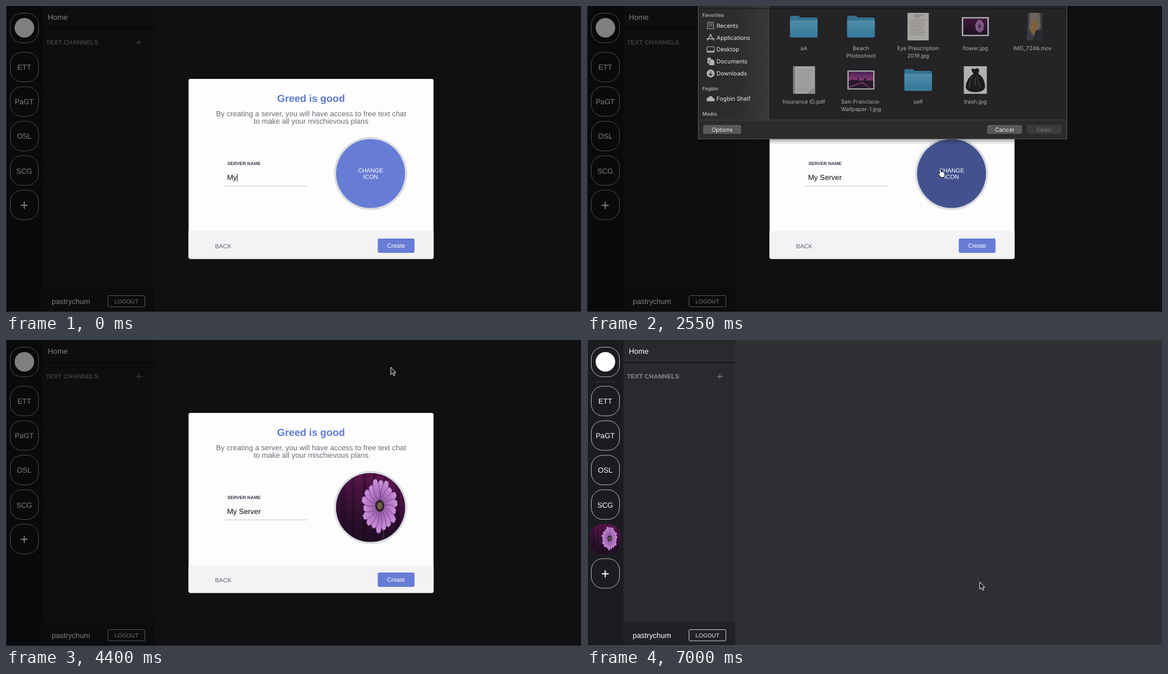
These frames come from a looping animation (1000x533 px, 7550 ms). An HTML page:

```html
<!DOCTYPE html>
<html lang="en">
<head>
<meta charset="utf-8">
<title>Create a server</title>
<style>
html, body { margin: 0; width: 100%; height: 100%; overflow: hidden; background: #101013; }
svg { display: block; width: 100vw; height: 100vh; }
text { font-family: "Liberation Sans", Arial, sans-serif; text-rendering: geometricPrecision; white-space: pre; }
#sheet text { font-family: Inter, Roboto, sans-serif; }
.mid { text-anchor: middle; }
.b { font-weight: 700; }
</style>
</head>
<body>
<svg viewBox="0 0 1000 533" preserveAspectRatio="none">
  <defs>
    <linearGradient id="plum" x1="0" y1="1" x2=".35" y2="0">
      <stop offset="0" stop-color="#180a1a"/><stop offset=".5" stop-color="#301031"/><stop offset="1" stop-color="#571549"/>
    </linearGradient>
    <linearGradient id="petalFill" x1="0" x2="0" y1="0" y2="1">
      <stop offset="0" stop-color="#cf93da"/><stop offset="1" stop-color="#8f58a4"/>
    </linearGradient>
    <linearGradient id="blue" x1="0" x2="0" y1="0" y2="1">
      <stop offset="0" stop-color="#62bfe8"/><stop offset="1" stop-color="#3f9fcf"/>
    </linearGradient>
    <linearGradient id="dusk" x1="0" x2="0" y1="0" y2="1">
      <stop offset="0" stop-color="#5b1f6b"/><stop offset=".5" stop-color="#b04a9a"/><stop offset=".6" stop-color="#38203f"/><stop offset="1" stop-color="#1d1224"/>
    </linearGradient>
    <linearGradient id="side" x1="0" x2="1" y1="0" y2="0">
      <stop offset="0" stop-color="#2a2a2b"/><stop offset=".55" stop-color="#2d2d2e"/><stop offset="1" stop-color="#3a3a3b"/>
    </linearGradient>
    <linearGradient id="shade" x1="0" x2="0" y1="0" y2="1">
      <stop offset="0" stop-color="#000" stop-opacity=".3"/><stop offset="1" stop-color="#000" stop-opacity="0"/>
    </linearGradient>
    <clipPath id="disc"><circle cx="634" cy="291.8" r="60"/></clipPath>
    <clipPath id="pill"><rect x="6" y="320.5" width="52" height="53" rx="20"/></clipPath>
    <clipPath id="thumb"><rect x="-21" y="-14.5" width="42" height="29"/></clipPath>
    <g id="flower"></g>
  </defs>

  <rect width="1000" height="533" fill="#2f3034"/>
  <rect x="63" width="194.5" height="533" fill="#292a2e"/>
  <rect width="63.5" height="533" fill="#1b1c20"/>
  <rect x="63" y="491" width="194.5" height="42" fill="#212226"/>
  <rect x="64" y="38" width="193.5" height="2" fill="#141518"/>
  <rect x="13" y="72" width="37" height="1.5" fill="#2b2c30"/>
  <rect id="veil" width="1000" height="533" fill="#000"/>

  <g id="faint" fill="none" stroke="#b8b8bb">
    <path d="M0.5 0V533M0 532.5H1000" stroke="#58595d"/>
    <g id="pills"></g>
    <rect x="177.5" y="504.5" width="64" height="19.5" rx="2" stroke="#d0d0d2"/>
    <path d="M226 63.5h10M231 58.5v10" stroke="#77787c" stroke-width="1.3"/>
    <text x="69.5" y="67" class="b" font-size="10.85" fill="#8a8b8f" stroke="none">TEXT CHANNELS</text>
  </g>
  <g id="bright" fill="#fff">
    <circle cx="32" cy="38" r="17"/>
    <g id="labels"></g>
    <text x="72.7" y="24" font-size="12.9">Home</text>
    <text x="79.5" y="518.5" font-size="12.9">pastrychum</text>
    <text x="209.5" y="517.8" font-size="9.8" class="mid" fill="#e2e2e4">LOGOUT</text>
  </g>
  <g id="plus">
    <rect x="7.5" y="320.8" width="49" height="51.5" rx="20" fill="none" stroke="#b8b8bb" id="plusBox"/>
    <path d="M25.7 347.3h12M31.7 341.3v12" stroke="#fff" stroke-width="1.9" id="plusSign"/>
  </g>
  <g id="newServer" clip-path="url(#pill)"><use href="#flower" transform="translate(6 320.5) scale(.4375)"/></g>

  <g id="modal">
    <rect x="317.5" y="127" width="426" height="313.5" rx="3" fill="#fdfdfe"/>
    <path d="M317.5 392h426v45.500q0 3-3 3h-420q-3 0-3-3z" fill="#f3f2f5"/>
    <g class="mid">
      <text x="530.5" y="166.7" class="mid b" font-size="17.55" fill="#607ad0">Greed is good</text>
      <g fill="#6a6d75" font-size="12.88">
        <text x="530.5" y="192.3">By creating a server, you will have access to free text chat</text>
        <text x="530.5" y="205.4">to make all your mischievous plans</text>
      </g>
    </g>
    <text x="385" y="277.2" class="b" font-size="7.9" fill="#363b4b">SERVER NAME</text>
    <text id="name" x="384.4" y="303" font-size="12.85" fill="#0c0c0e"></text>
    <rect id="caret" y="292" width="1" height="13.500" fill="#111"/>
    <rect x="378" y="312.500" width="146" height="1.700" fill="#dcdde1"/>
    <circle cx="634" cy="291.8" r="63.7" fill="#dcdde1"/>
    <circle id="disk" cx="634" cy="291.8" r="60"/>
    <g class="mid" fill="#fff" font-size="10.3">
      <text x="634" y="290.3">CHANGE</text><text x="634" y="300.6">ICON</text>
    </g>
    <g id="photo" clip-path="url(#disc)"><use href="#flower" x="574" y="231.8"/></g>
    <text x="363.500" y="421.600" font-size="10.5" fill="#62656e">BACK</text>
    <rect id="create" x="646.500" y="405" width="64" height="25" rx="3"/>
    <text x="678.400" y="421" class="mid" font-size="10.5" fill="#fff">Create</text>
  </g>

  <g id="sheet">
    <rect x="194" y="233" width="640" height="9" fill="url(#shade)"/>
    <rect x="193.500" y="-40" width="641" height="272.500" fill="#2b2b2c" stroke="#575758"/>
    <g id="content">
      <rect x="194" y="-10" width="124" height="209" fill="url(#side)"/>
      <rect x="318.500" y="-10" width="515.500" height="209" fill="#242325"/>
      <path d="M318.500 0V199" stroke="#121213"/>
      <path d="M194 5.500H834" stroke="#161617"/>
      <g id="sidebar"></g>
      <g id="files"></g>
    </g>
    <path d="M194 199.500H834" stroke="#434345"/>
    <g class="mid" font-size="10" fill="#ececec">
      <rect x="202" y="208" width="66" height="15.500" rx="2.500" fill="#59595b"/>
      <text x="235" y="219.500">Options</text>
      <rect x="696" y="208" width="60.500" height="15.500" rx="2.500" fill="#59595b"/>
      <text x="726" y="219.500">Cancel</text>
      <rect id="open" x="765" y="208" width="60.500" height="15.500" rx="2.500"/>
      <text id="openText" x="795" y="219.500">Open</text>
    </g>
  </g>

  <g id="mouse">
    <path id="arrow" d="M0 0V12.600L3 10L5.200 14.600L7.300 13.600L5.200 9.200H8.800Z" fill="#111" stroke="#fff" stroke-linejoin="round"/>
    <path id="hand" d="M-2.600 1.400Q-2.600 0-1.400 0Q-.2 0 0 1.400L1 5Q2.200 4.200 3.200 5.200Q4.500 4.600 5.300 5.800Q7 5.600 7 7.400V10Q7 12 6 13V14.500H0Q-.5 12.500-2.500 10.600L-4.500 8.200Q-4.600 6.800-3 7L-1.400 8.400Z" fill="#fff" stroke="#111" stroke-linejoin="round"/>
  </g>
</svg>
<script>
const LOOP = 7550;
const $ = id => document.getElementById(id);
const set = (id, attrs) => { for (const k in attrs) $(id).setAttribute(k, attrs[k]); };
const show = (id, on) => set(id, { visibility: on ? 'visible' : 'hidden' });
const ramp = (t, from, to) => Math.min(1, Math.max(0, (t - from) / (to - from)));
const ease = u => u * u * (3 - 2 * u);
const mix = (a, b, u) => a + (b - a) * u;
const blend = (a, b, u) => `rgb(${a.map((v, i) => Math.round(mix(v, b[i], u)))})`;

// Flower picture, 120 units high, wide enough for any crop
function flower() {
  let s = '<rect x="-45" width="190" height="120" fill="url(#plum)"/>';
  for (let i = 0; i < 9; i++)
    s += `<rect x="${-30 + i * 19}" width="${4 + i * 7 % 5}" height="120" fill="#150617" opacity=".3"/>`;
  s += '<path d="M79 60Q84 95 82 120" stroke="#3a2140" stroke-width="3" fill="none"/><g transform="translate(76 57) scale(.68 1)">';
  for (let i = 0; i < 18; i++) {
    const long = 45 + 3 * Math.sin(i * 2.3);
    s += `<path transform="rotate(${i * 20 + 4})" d="M0 -6C-9 -18-10 ${6 - long} -3 ${-long}Q0 ${1 - long} 3 ${-long}C10 ${6 - long} 9 -18 0 -6Z" fill="url(#petalFill)" stroke="#6a3a80" stroke-width=".9"/>`;
  }
  return s + '</g><ellipse cx="76" cy="57" rx="8" ry="10.500" fill="#33232b"/><ellipse cx="76" cy="57" rx="4.500" ry="6" fill="#6f6049"/>';
}

function serverList() {
  ['', 'ETT', 'PaGT', 'OSL', 'SCG'].forEach((name, i) => {
    const y = i ? 20.5 + i * 60.1 : 12.500;
    $('pills').innerHTML += `<rect x="7.5" y="${y}" width="49" height="51.500" rx="20"/>`;
    $('labels').innerHTML += `<text x="31.7" y="${y + 30.600}" class="mid" font-size="12.700">${name}</text>`;
  });
}

const icons = {
  tray: '<path d="M-5-6H5V1L6 5H-6L-5 1ZM-3-3H3M-3 0H3" />',
  tools: '<path d="M-6 5L1-6M6 5L-1-6M-7 2H7" stroke-width="1.500"/>',
  screen: '<rect x="-6.500" y="-5" width="13" height="10" rx="1"/><path d="M-6 3H6" stroke-width="2"/>',
  pages: '<path d="M-5-6H0V-3H4L6-1V6H-2V3H-5Z" fill="#b2b2b4"/><path d="M-2 3V-3" stroke="#333"/>',
  down: '<circle r="6.500" fill="#b2b2b4"/><path d="M0-3.500V3M-3 0.500L0 3.500L3 .5" stroke="#333" stroke-width="1.500"/>',
  cloud: '<path d="M-5 4Q-8 3-6.500 0Q-5-2-3.500-1.500Q-2-5 1.500-4Q4-3 4-.5Q7-.5 7 2Q7 4 5 4Z" fill="#b2b2b4"/>'
};

function sidebar() {
  const head = (y, s) => `<text x="200.500" y="${y}" font-size="8.500" font-weight="600" fill="#a9a9ab">${s}</text>`;
  const row = (y, icon, s) =>
    `<g transform="translate(215 ${y - 3.500})" fill="none" stroke="#b2b2b4">${icons[icon]}</g><text x="225.300" y="${y}" font-size="10" fill="#e6e6e7">${s}</text>`;
  $('sidebar').innerHTML = head(20, 'Favorites') + row(38.600, 'tray', 'Recents') + row(59.500, 'tools', 'Applications') +
    row(80.200, 'screen', 'Desktop') + row(101, 'pages', 'Documents') + row(121.800, 'down', 'Downloads') +
    head(147.500, 'Fogbin') + row(165.800, 'cloud', 'Fogbin Shelf') + head(191.700, 'Media');
}

// Thumbnails, each centred on its own origin
const lines = (x, y, w, n, gap, color) =>
  `<path d="${Array.from({ length: n }, (_, i) => `M${x} ${y + i * gap}h${w - i * 5 % 7}`).join('')}" stroke="${color}" stroke-width=".8"/>`;
const framed = inner => '<rect x="-23.500" y="-16.500" width="47" height="33" fill="#f4f4f4"/>' + inner;
const folder = '<path d="M-24-16q0-3 3-3h11q2 0 3 2l1 1h27q3 0 3 3V16q0 3-3 3H-21q-3 0-3-3z" fill="#3d97c5"/><path d="M-24-10H24V16q0 3-3 3H-21q-3 0-3-3z" fill="url(#blue)"/><path d="M-24-10H24" stroke="#86d2f2" stroke-width=".8"/>';
const thumbs = {
  folder,
  form: '<rect x="-18.500" y="-24" width="37" height="48" fill="#e6e3dc"/>' + lines(-8, -20, 17, 2, 3, '#777') + lines(-14, -12, 28, 9, 3.200, '#aaa69e'),
  flower: framed('<g clip-path="url(#thumb)"><use href="#flower" transform="translate(-11 -14.500) scale(.2417)"/></g>'),
  clip: '<rect x="-17" y="-24" width="34" height="48" fill="#4a4a4e"/><path d="M-17-24H-8L-10 24H-17Z" fill="#24242a"/><path d="M-5-24H12L14 0L3 18L-6 4Z" fill="#8b8175"/><path d="M-3-8Q4-15 8-4Q7 14-1 13Z" fill="#b07a43"/><path d="M6 6H17V24H0Z" fill="#2b3038"/>',
  pad: '<rect x="-18.500" y="-24" width="38" height="48" fill="#dedede"/><path d="M-16.500-23V24" stroke="#777" stroke-width="3" stroke-dasharray="1.500 1.500"/>' + lines(-11, -17, 26, 11, 3.500, '#b9b9bb') + '<path d="M5 24L19.500 10V24Z" fill="#bbb"/>',
  city: framed('<rect x="-21.500" y="-14.500" width="43" height="29" fill="url(#dusk)"/><path d="M-21 2L-14-2V0H-6V-5H-4V1H5V-3H9V1H21V5H-21Z" fill="#2a1531"/><path d="M-21 13L2 4L14 13" fill="none" stroke="#c65a9c" stroke-width="1.200"/>'),
  bag: '<rect x="-20" y="-24" width="40" height="48" fill="#f5f5f5"/><path d="M-3-11Q-10-20-4-20Q0-18 3-21Q9-19 5-11Q16-5 17 12Q15 21 0 21Q-15 21-17 12Q-15-4-3-11Z" fill="#18191b"/><path d="M-4-8Q-11 2-10 14M3-8Q4 4 9 13M0-4V10" fill="none" stroke="#55585c" stroke-width="1.300"/>'
};

const list = [
  ['folder', 'aA'], ['folder', 'Beach', 'Photoshoot'], ['form', 'Eye Prescription', '2019.jpg'],
  ['flower', 'flower.jpg'], ['clip', 'IMG_7246.mov'], ['pad', 'Insurance ID.pdf'],
  ['city', 'San-Francisco-', 'Wallpaper-1.jpg'], ['folder', 'self'], ['bag', 'trash.jpg']
];
const locked = ['clip', 'pad'];

function files() {
  $('files').innerHTML = list.map(([kind, a, b = ''], i) => {
    const x = 377 + i % 5 * 99.450, y = i < 5 ? 36.700 : 129.700;
    const mark = kind === 'flower' ? '<g id="picked"><rect x="-28" y="-27" width="56" height="54" rx="4" fill="#48484a"/><rect x="-26" y="31" width="52" height="13" rx="3" fill="#1159cf"/></g>' : '';
    return `<g class="file" transform="translate(${x} ${y})">${mark}${thumbs[kind]}<g class="mid" font-size="9.500" fill="#f0f0f0"><text y="41">${a}</text><text y="53.700">${b}</text></g></g>`;
  }).join('');
}

$('flower').innerHTML = flower();
serverList();
sidebar();
files();
const fileNodes = document.querySelectorAll('.file');

// time, x, y
const path = [[1350, 470, 345], [1900, 611.5, 323], [2100, 615, 284], [2700, 615, 284],
  [3300, 669, 43], [4350, 669, 43], [5150, 683, 421.5]];
function pointer(t) {
  let i = 0;
  while (i < path.length - 2 && t > path[i + 1][0]) i++;
  const [a, b] = [path[i], path[i + 1]], u = ease(ramp(t, a[0], b[0]));
  return [mix(a[1], b[1], u), mix(a[2], b[2], u)];
}

const keys = [150, 300, 420, 520, 640, 760, 900];
const base = [103, 124, 212], dark = [67, 82, 143], pressed = [88, 107, 184];

function draw(t) {
  const fade = ramp(t, 5620, 5950);
  set('veil', { opacity: mix(.66, 0, fade) });
  set('modal', { opacity: 1 - fade });
  const low = mix(.38, 1, fade), high = mix(.48, 1, fade);
  set('faint', { opacity: low });
  set('bright', { opacity: high });
  set('plusBox', { opacity: low });
  set('plusSign', { opacity: high });
  set('plus', { transform: `translate(0 ${t >= 5650 ? 60 : 0})` });
  show('newServer', t >= 6150);

  $('name').textContent = 'My Server'.slice(0, 2 + keys.filter(k => t >= k).length);
  show('caret', t < 1450 || t >= 1950 && t < 2150);
  set('caret', { x: 384.6 + $('name').getComputedTextLength() });

  set('disk', { fill: blend(base, dark, ramp(t, 1700, 2000) - ramp(t, 2880, 3180)) });
  show('photo', t >= 4200);
  set('create', { fill: blend(base, pressed, ramp(t, 5050, 5250)) });

  const down = ease(ramp(t, 2150, 2565)) - ease(ramp(t, 3830, 4130));
  show('sheet', down > 0);
  set('sheet', { transform: `translate(0 ${-243 * (1 - down) + 10 * (1 - down)})` });
  set('content', { display: t < 3810 ? 'inline' : 'none' });
  const ready = t >= 2650, picked = t >= 3500;
  fileNodes.forEach((n, i) => n.setAttribute('opacity', !ready ? .68 : locked.includes(list[i][0]) ? .42 : 1));
  set('picked', { display: picked ? 'inline' : 'none' });
  set('open', { fill: picked ? '#59595b' : '#3b3b3d' });
  set('openText', { fill: picked ? '#ececec' : '#7c7c7e' });

  const [x, y] = pointer(t);
  const onDisk = Math.hypot(x - 634, y - 291.8) < 64;
  const covered = down > 0 && y < 233 * down;
  const hand = t < 5800 && !covered && (onDisk || y > 405);
  set('mouse', { transform: `translate(${x} ${y})`, display: t < 1350 ? 'none' : 'inline' });
  show('arrow', !hand);
  show('hand', hand);
}

const start = performance.now();
function tick() {
  draw((performance.now() - start) % LOOP);
  requestAnimationFrame(tick);
}
tick();
</script>
</body>
</html>
```
